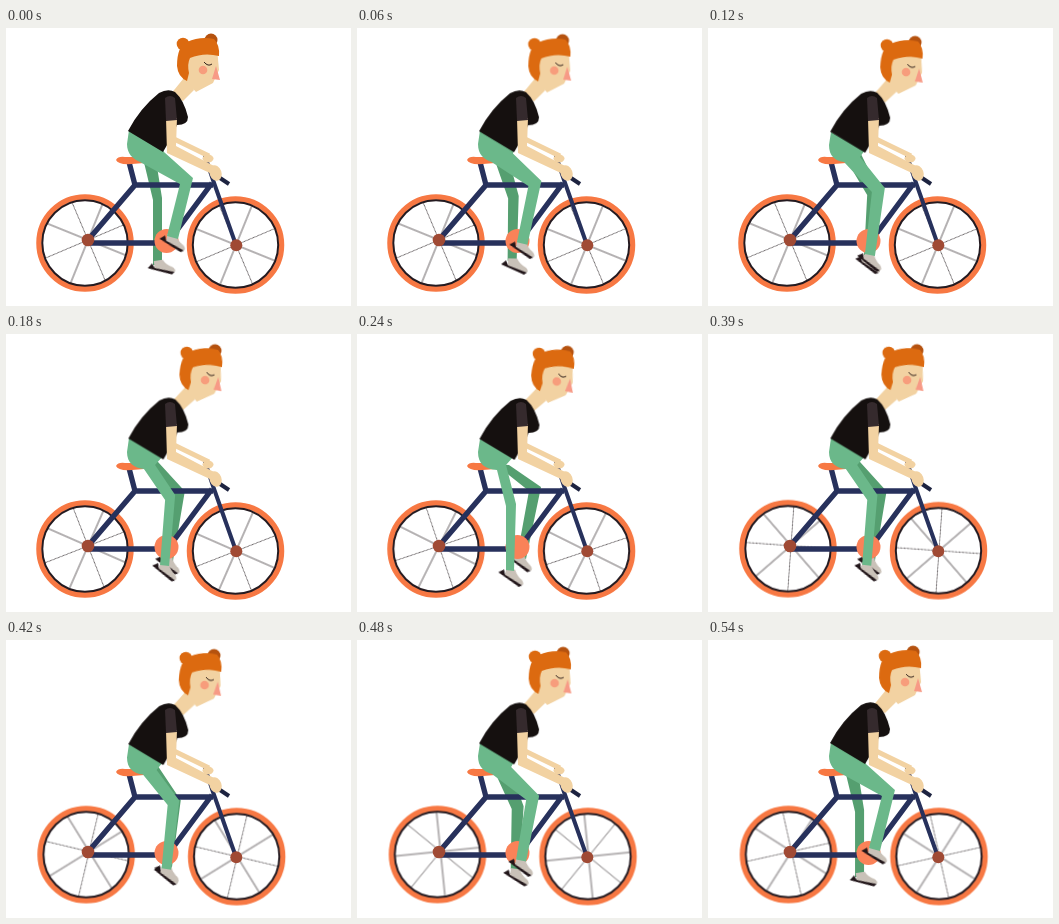
An HTML page without scripts for the animation above (0.57 s loop, 345x278 px).

```html
<!DOCTYPE html>
<html lang="en">
<head>
<meta charset="utf-8">
<title>Cyclist</title>
<style>
  html, body { margin: 0; width: 100%; height: 100%; overflow: hidden; background: #fff; }
  svg { display: block; width: 100%; height: 100%; }

  .anim { animation: 570ms linear infinite; }
  .rim { fill: none; stroke: #f77843; stroke-width: 5.5; }
  .tyre { fill: none; stroke: #241a20; stroke-width: 2; }
  .spokes { stroke: #2b2528; stroke-width: .7; animation-name: spin; animation-timing-function: cubic-bezier(.5, 0, .75, 0); }
  .wheel { animation-name: drift; }
  .hub { fill: #a04a34; }
  .frame { fill: none; stroke: #27315c; stroke-width: 5.3; }
  .skin { fill: #f2d2a2; }
  .hair { fill: #dc6a10; }
  .near { fill: #6bb88a; animation-name: near-leg; }
  .far { fill: #559f70; animation-name: far-leg; }
  .near-shoe { animation-name: near-shoe; }
  .far-shoe { animation-name: far-shoe; }
  .head, .torso { animation: nod 285ms ease-in-out infinite alternate; }
  .head { transform-origin: 172px 65px; }
  .torso { animation-name: sink; }

  @keyframes drift { 0%, 42% { transform: none; } 84%, 100% { transform: translate(1.5px, -.5px); } }
  @keyframes spin { from { transform: rotate(22deg); } to { transform: rotate(146deg); } }
  @keyframes nod { to { transform: translate(1px, 3.5px) rotate(5deg); } }
  @keyframes sink { to { transform: translate(.5px, 2px); } }

  @keyframes near-leg {
    0%, 5%, 95%, 100% { d: path("M123 102L121 116C121 126 127 131 134 134L174 156L161 208L172 211L187 150L158 124L157 122Z"); }
    16%, 84% { d: path("M123 103L121 116C121 127 127 132 135 134L169 160L159 220L169 222L182 156L154 127L157 122Z"); }
    21%, 79% { d: path("M123 104L121 117C121 128 127 133 136 134L164 164L157 226L167 228L177 160L152 129L157 122Z"); }
    32%, 68% { d: path("M123 104L121 118C121 129 128 134 138 135L159 166L154 231L163 232L169 161L149 131L157 122Z"); }
    42%, 58% { d: path("M123 105L121 118C121 130 128 135 140 136L149 172L149 236L157 237L159 170L149 131L157 122Z"); }
  }
  @keyframes far-leg {
    0%, 5%, 95%, 100% { d: path("M136 126L147 172L147 237L156 237L156 170L149 126Z"); }
    16%, 84% { d: path("M136 128L155 169L154 229L163 230L167 166L152 126Z"); }
    21%, 79% { d: path("M136 128L159 167L156 227L165 228L171 163L153 126Z"); }
    32%, 68% { d: path("M136 128L168 162L158 226L167 227L179 157L152 128Z"); }
    42%, 58% { d: path("M138 130L172 157L160 223L169 225L184 153L152 131Z"); }
  }
  @keyframes near-shoe {
    0%, 5%, 95%, 100% { transform: translate(162px, 208px) rotate(9deg); }
    16%, 84% { transform: translate(160px, 220px) rotate(14deg); }
    21%, 79% { transform: translate(158px, 226px) rotate(16deg); }
    32%, 68% { transform: translate(155px, 230px) rotate(16deg); }
    42%, 58% { transform: translate(150px, 236px) rotate(12deg); }
  }
  @keyframes far-shoe {
    0%, 5%, 95%, 100% { transform: translate(149px, 235px) rotate(-9deg); }
    16%, 84% { transform: translate(155px, 230px) rotate(10deg); }
    21%, 79% { transform: translate(156px, 229px) rotate(14deg); }
    32%, 68% { transform: translate(158px, 223px) rotate(15deg); }
    42%, 58% { transform: translate(159px, 221px) rotate(14deg); }
  }
</style>
</head>
<body>
<svg viewBox="0 0 345 278">
  <defs>
    <clipPath id="left-disc"><circle cx="79" cy="215" r="43"/></clipPath>
    <clipPath id="right-disc"><circle cx="229.500" cy="217" r="43"/></clipPath>
    <path id="spokes" d="M-50 0H50M0-50V50M-35-35L35 35M-35 35L35-35"/>
    <g id="rim">
      <circle class="rim" r="46"/>
      <circle class="tyre" r="42.700"/>
    </g>
    <g id="shoe">
      <path fill="#c9c1b8" d="M-1-2H8Q11 4 17 7Q20 10 18 12L-1 6Z"/>
      <path fill="#211519" d="M-3 0L-8 4L15 14L18 12L-1 5Z"/>
    </g>
  </defs>

  <!-- far leg -->
  <path class="anim far"/>
  <g class="anim far-shoe"><use href="#shoe"/></g>

  <!-- wheels -->
  <g class="anim wheel">
    <g clip-path="url(#left-disc)"><g transform="translate(82 212)"><use class="anim spokes" href="#spokes"/></g></g>
    <use href="#rim" x="79" y="215"/>
  </g>
  <g class="anim wheel">
    <g clip-path="url(#right-disc)"><g transform="translate(230 217)"><use class="anim spokes" href="#spokes"/></g></g>
    <use href="#rim" x="229.500" y="217"/>
  </g>

  <!-- bicycle -->
  <path class="frame" d="M123 134L129 157L82 212M127 157H207M82 215H160M163 213L206 155"/>
  <path class="frame" stroke-linejoin="round" style="stroke-width:4" d="M197 128H199L207 152L230 217"/>
  <path fill="#f77843" d="M110 132Q112 128 119 129H138V135L126 136Q112 137 110 132Z"/>
  <circle cx="160.500" cy="213" r="12" fill="#fa8258"/>
  <circle class="hub" cx="82" cy="212" r="6.300"/>
  <circle class="hub" cx="230.300" cy="217.200" r="6"/>

  <!-- near leg -->
  <g class="anim near-shoe"><use href="#shoe"/></g>
  <path class="anim near"/>

  <!-- head -->
  <g class="head">
    <path class="skin" d="M182 45L164 67L177 73L188 62Z"/>
    <path class="skin" d="M182 28L211 20L213 42L207 55L190 64L181 54Z"/>
    <path fill="#f79a86" d="M210 38L214 52L206 51Z"/>
    <circle fill="#b5520f" cx="205" cy="12" r="6.500"/>
    <circle class="hair" cx="177" cy="16" r="6.300"/>
    <path class="hair" d="M171 38Q171 18 181 14Q194 8 208 11Q214 17 213 28Q198 24 184 30Q181 36 183 45L181 53Q172 49 171 38Z"/>
    <circle fill="#f79d7c" cx="197" cy="42" r="4.300"/>
    <path fill="none" stroke="#33231c" d="M198 34Q202 39 206 36"/>
  </g>

  <!-- torso and arms -->
  <path fill="none" stroke="#f2d2a2" stroke-width="5" d="M168 111L203 128"/>
  <ellipse class="skin" cx="202" cy="130.500" rx="5.500" ry="4"/>
  <path class="torso" fill="#15100f" d="M122 103Q134 80 153 65Q162 60 169 64Q178 72 182 89Q182 97 171 97Q166 109 157 124Z"/>
  <path class="skin" d="M160 90H171L170 118L208 138L206 146L161 125Z"/>
  <path fill="none" stroke="#1d2340" stroke-width="4" d="M211 148L223 156"/>
  <ellipse class="skin" cx="209.500" cy="145" rx="6" ry="8" transform="rotate(-20 209.500 145)"/>
  <path fill="#352a2d" d="M159 70Q164 66 169 70L171 92L160 93Z"/>
</svg>
</body>
</html>
```
